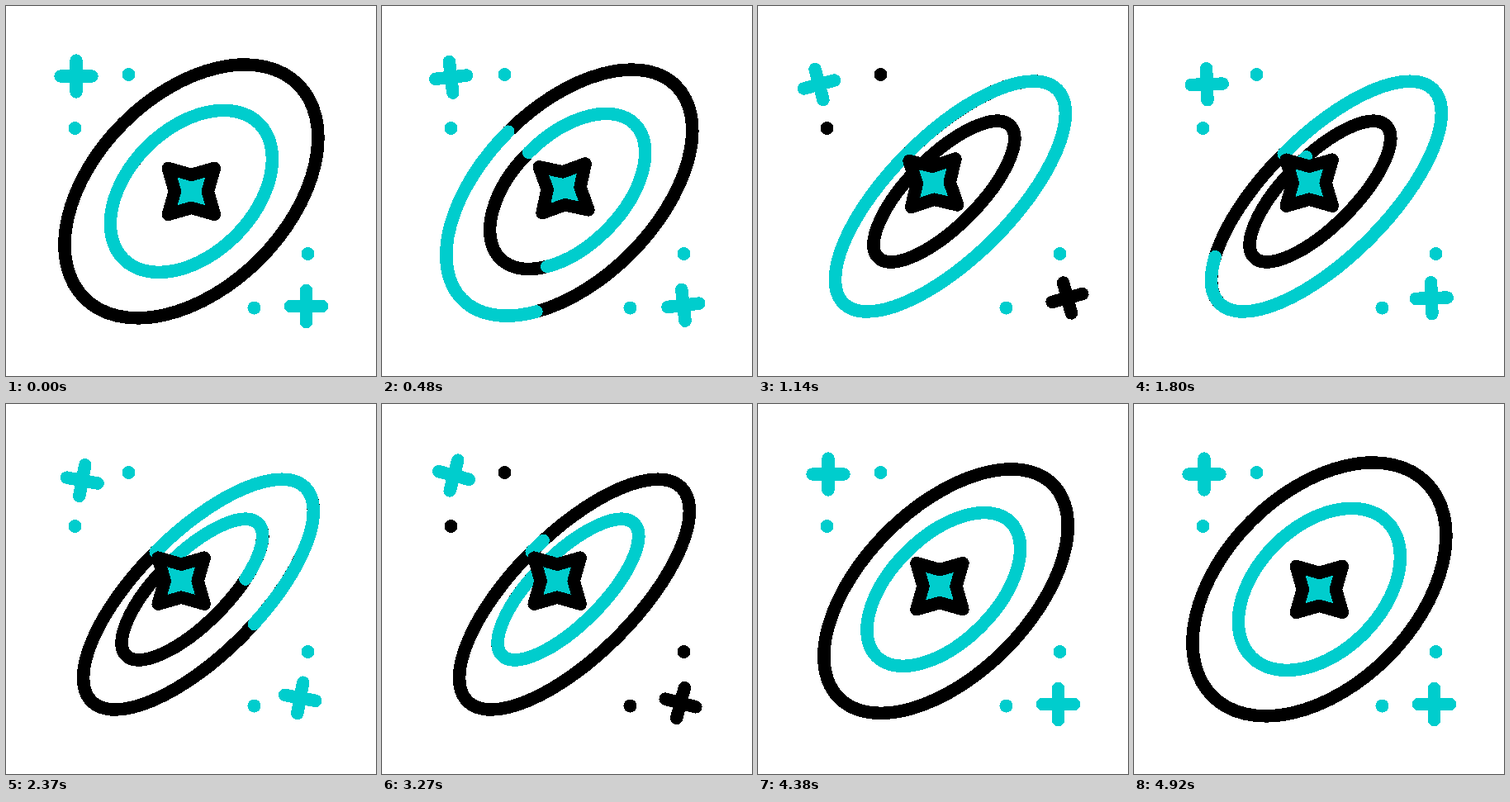
These frames come from a looping animation (448 px wide and 448 px high, 5400 ms). An HTML page:

```html
<!DOCTYPE html>
<html>
<head>
<meta charset="utf-8">
<style>
  html, body { margin: 0; height: 100%; overflow: hidden; background: #fff; }
  svg { display: block; width: 100%; height: 100%; shape-rendering: crispEdges; }
  path { fill: none; stroke-width: 15.5; stroke-linecap: round; stroke-linejoin: round; }
</style>
</head>
<body>
<svg viewBox="0 0 448 448">
  <g id="outer"><path stroke="#000"/><path stroke="#00cdcd" pathLength="1"/></g>
  <g id="inner"><path stroke="#000"/><path stroke="#00cdcd" pathLength="1"/></g>
  <path id="star" d="M-28-28L0-20 28-28 20 0 28 28 0 20-28 28-20 0Z" style="fill:#00cdcd" stroke="#000"/>
  <path id="plusA" d="M-19 0H19M0-19V19" stroke="#00cdcd"/>
  <path id="plusB" d="M-19 0H19M0-19V19"/>
  <g id="dotsA"><circle cx="148.5" cy="83" r="8"/><circle cx="83.5" cy="148" r="8"/></g>
  <g id="dotsB"><circle cx="365.5" cy="300" r="8"/><circle cx="300.5" cy="365.5" r="8"/></g>
</svg>
<script>
const LOOP = 5400, TEAL = '#00cdcd', BLACK = '#000', MID = 224.4;
const $ = id => document.getElementById(id);

// Eased progress from 0 to 1 between two times
const ease = (t, from, to) => {
  const x = Math.min(1, Math.max(0, (t - from) / (to - from)));
  return x * x * (3 - 2 * x);
};

// Plus sign drift: time, x offset, y offset, angle
const drift = [
  [0, 0, 0, 0], [480, -1.4, 1.2, -6.5], [1140, -11, 10, -15], [1710, 2, 10, -4],
  [2370, 7.3, 7.6, 10.5], [2850, 5, 5, 15], [3270, 2, 1.5, 14.7],
  [3700, 0.3, 0, 8.5], [4050, 0, 0, 2.5], [4450, 0, 0, 0], [LOOP, 0, 0, 0]
];

function slope(i, k) {
  if (i === 0 || i >= drift.length - 2) return 0;
  return (drift[i + 1][k] - drift[i - 1][k]) / (drift[i + 1][0] - drift[i - 1][0]);
}

// Smooth curve through the drift keys
function driftAt(t, k) {
  const i = drift.findIndex((key, n) => n > 0 && t <= key[0]) - 1;
  const a = drift[i], b = drift[i + 1], span = b[0] - a[0], x = (t - a[0]) / span;
  return a[k] + (b[k] - a[k]) * x * x * (3 - 2 * x)
    + span * x * (1 - x) * (slope(i, k) * (1 - x) - slope(i + 1, k) * x);
}

function place(el, x, y, angle) {
  el.setAttribute('transform', `translate(${x} ${y}) rotate(${angle})`);
}

// Black ring with a teal arc from start to end (shares of its length)
function ring(id, x, y, a, b, start, end) {
  const group = $(id), arc = group.lastElementChild;
  place(group, x, y, -45);
  for (const path of group.children)
    path.setAttribute('d', `M0 ${-b}A${a} ${b} 0 0 0 0 ${b}A${a} ${b} 0 0 0 0 ${-b}`);
  arc.style.strokeDasharray = `${end - start} 2`;
  arc.style.strokeDashoffset = -start;
  arc.style.display = end - start > 0.001 ? '' : 'none';
}

function draw(t) {
  const squeeze = ease(t, 100, 1200) - ease(t, 3600, 4920);
  const swap = ease(t, 0, 1200);
  ring('outer', MID + 8.6 * squeeze, MID + 6.2 * squeeze, 183, 116.6 - 43.3 * squeeze,
    ease(t, 1180, 3480), swap);
  ring('inner', MID + squeeze, MID + 0.2 * squeeze, 116 - 3 * squeeze, 76 - 34 * squeeze,
    swap - ease(t, 1600, 3400), 1);

  const shift = swap - ease(t, 3600, 4920);
  place($('star'), MID - 12.2 * shift, MID - 10.2 * shift,
    4.3 * (ease(t, 600, 1900) - ease(t, 0, 600)));

  const [dx, dy, angle] = [1, 2, 3].map(k => driftAt(t, k));
  place($('plusA'), 85 + dx, 85 + dy, angle);
  place($('plusB'), 363.5 - dx, 363.5 - dy, angle);

  const early = t >= 810 && t < 1755, late = t >= 2820 && t < 3660;
  $('plusB').style.stroke = $('dotsA').style.fill = early || late ? BLACK : TEAL;
  $('dotsB').style.fill = late ? BLACK : TEAL;
}

function tick() {
  draw(performance.now() % LOOP);
  requestAnimationFrame(tick);
}
tick();
</script>
</body>
</html>
```
